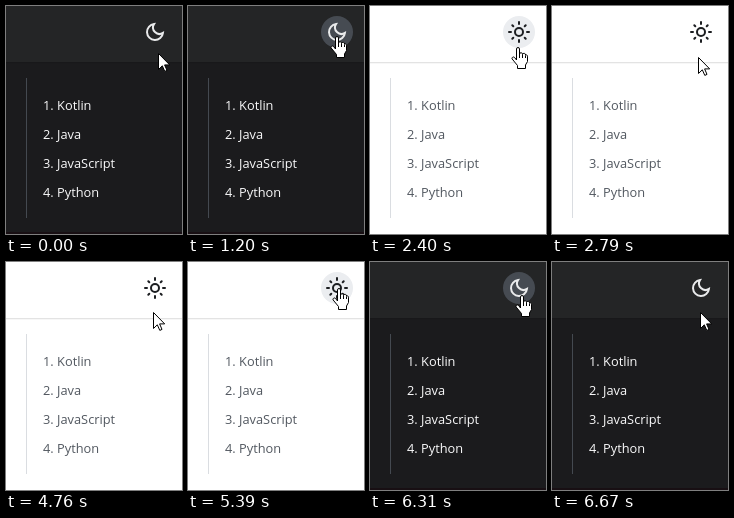
An HTML page that plays this animation: 176 px wide and 228 px high, repeating every 9820 ms.

```html
<!DOCTYPE html>
<html lang="en">
<head>
<meta charset="utf-8">
<title>Theme toggle</title>
<style>
  html, body { margin: 0; width: 100%; height: 100%; overflow: hidden; }
  svg { display: block; width: 176px; height: 228px; }
  .dark { --page: #1b1b1d; --bar: #242526; --line: #444950; --icon: #e9eaeb; --foot: #180f13; }
  .light { --page: #fff; --bar: #fff; --line: #dadde1; --icon: #1c1e21; --foot: #fff; }
  .dark #sun, .light #moon { display: none; }
  .icon { fill: none; stroke: var(--icon); stroke-width: 2; }
  .cursor { fill: #fff; stroke: #000; stroke-linejoin: round; }
  text { font: 12.8px "Open Sans", "Noto Sans", sans-serif; white-space: pre; }
</style>
</head>
<body>
<svg id="stage" class="dark" viewBox="0 0 176 228">
  <rect width="176" height="228" fill="var(--page)"/>
  <rect y="226" width="176" height="2" fill="var(--foot)"/>
  <rect width="176" height="56" fill="var(--bar)"/>
  <rect y="56" width="176" height="1" opacity=".11"/>
  <rect y="57" width="176" height="1" opacity=".03"/>
  <rect x="20" y="72" width="1" height="140" fill="var(--line)"/>
  <g id="list">
    <text x="37" y="104">1. Kotlin</text>
    <text x="37" y="133">2. Java</text>
    <text x="37" y="162">3. JavaScript</text>
    <text x="37" y="191">4. Python</text>
  </g>
  <circle id="disc" cx="149" cy="26" r="16"/>
  <g class="icon" transform="translate(137 14)">
    <path id="moon" d="M11.1 4.05A8 8 0 1 0 19.95 12.9A6.4 6.4 0 0 1 11.1 4.05Z"/>
    <g id="sun" stroke-linecap="round">
      <circle cx="12" cy="12" r="4"/>
      <path d="M12 2v2M12 20v2M2 12h2M20 12h2M5.3 5.3l1 1M17.7 17.7l1 1M5.3 18.7l1-1M17.7 6.3l1-1"/>
    </g>
  </g>
  <path id="arrow" class="cursor" d="M.5.5V16.5L4.3 12.8 6.8 18.4 9 17.4 6.6 11.9H11.7Z"/>
  <g id="hand" class="cursor">
    <path d="M5.5 13V2a1.5 1.5 0 0 1 3 0V7a1.5 1.5 0 0 1 3 .5a1.5 1.5 0 0 1 3 .7a1.2 1.2 0 0 1 2 1V14.5L14.5 18V21.5H6.5V18.5L1 11.8a1.5 1.5 0 0 1 2.5-1.4Z"/>
    <path fill="none" d="M8.5 7v4M11.5 7.5v3.5M14.5 8.5v2.5"/>
  </g>
</svg>
<script>
const LOOP = 9820;
const $ = id => document.getElementById(id);

const steps = [
  [0, 'arrow', 152, 47], [930, 'hand', 143, 38], [1080, 'hand', 142, 32], [1200, 'hand', 142, 30],
  [2010, 'hand', 142, 30], [2130, 'hand', 143, 31], [2250, 'hand', 144, 32], [2400, 'hand', 141, 41],
  [2550, 'arrow', 145, 47], [2670, 'arrow', 146, 50], [2790, 'arrow', 146, 51], [4760, 'arrow', 147, 50],
  [4910, 'hand', 145, 40], [5030, 'hand', 142, 28], [5150, 'hand', 142, 19], [5270, 'hand', 143, 23],
  [5390, 'hand', 144, 26], [5920, 'hand', 145, 25], [6040, 'hand', 145, 25], [6160, 'hand', 145, 25],
  [6310, 'hand', 145, 33], [6430, 'arrow', 147, 45], [6550, 'arrow', 148, 49], [6670, 'arrow', 148, 50]
];

// 200 ms eased transition from 0 to 1
const ramp = (t, start) => 1 - (1 - Math.min(1, Math.max(0, (t - start) / 200))) ** 2.1;
const mix = (a, b, k) => `rgb(${a.map((v, i) => Math.round(v + (b[i] - v) * k))})`;

function draw(now) {
  const time = now % LOOP;
  const [t, shape, x, y] = steps.findLast(step => step[0] <= time);
  const light = ramp(t, 1944) - ramp(t, 5854);
  const hover = ramp(t, 1000) - ramp(t, 2490) + ramp(t, 4850) - ramp(t, 6370);

  $('stage').setAttribute('class', t >= 2010 && t < 5920 ? 'light' : 'dark');
  $('list').setAttribute('fill', mix([250, 250, 251], [82, 88, 96], light));
  $('disc').setAttribute('fill', mix([70, 75, 82], [235, 237, 240], light));
  $('disc').setAttribute('opacity', hover);
  for (const id of ['arrow', 'hand']) {
    $(id).setAttribute('visibility', id === shape ? 'visible' : 'hidden');
  }
  $(shape).setAttribute('transform', `translate(${x} ${y})`);
}

const start = performance.now();
function tick() {
  draw(performance.now() - start);
  requestAnimationFrame(tick);
}
tick();
</script>
</body>
</html>
```
